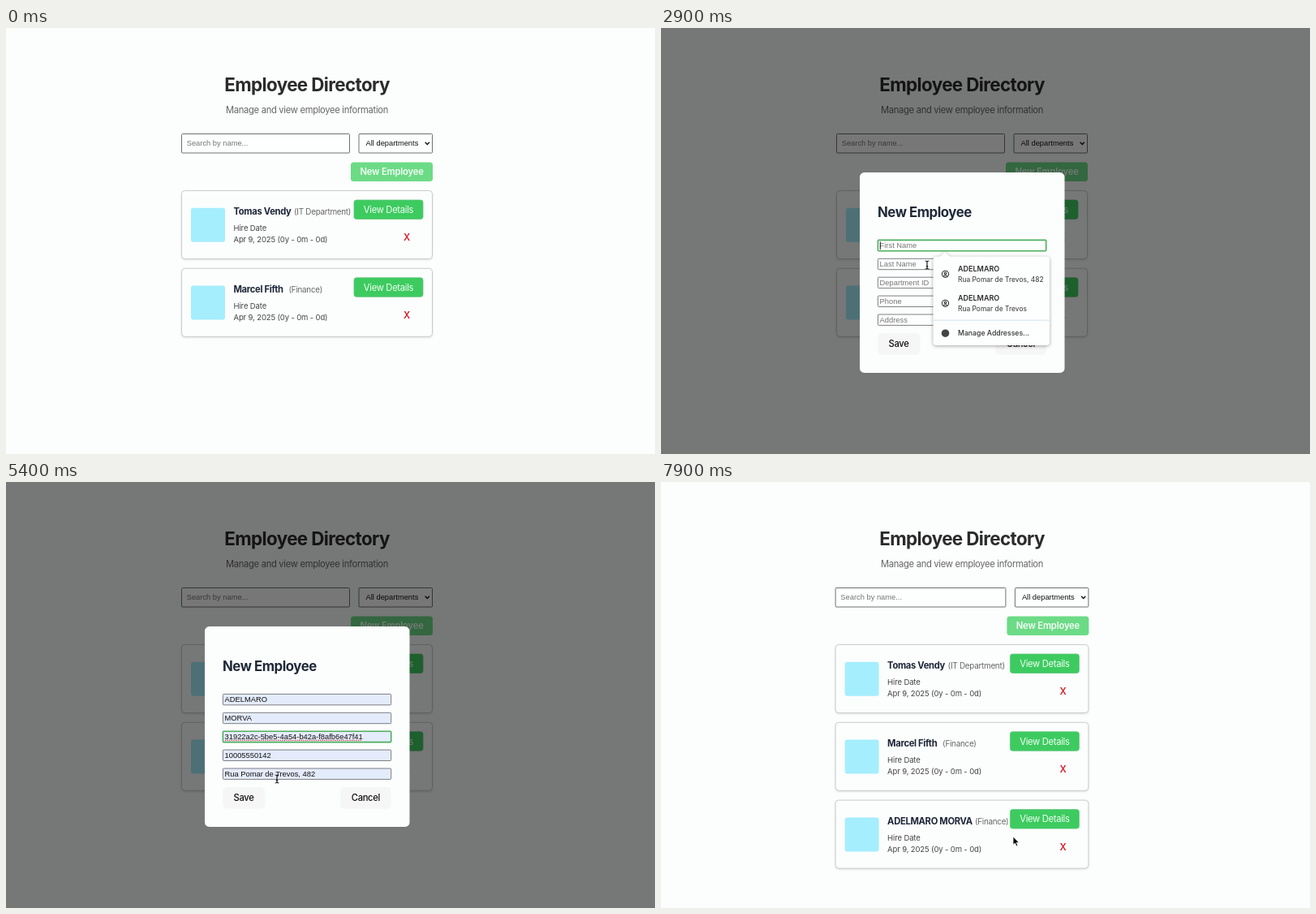
An HTML page that plays this animation: 800 by 525 pixels, repeating every 8000 ms.

```html
<!DOCTYPE html>
<html lang="en">
<head>
<meta charset="utf-8">
<title>Employee Directory</title>
<style>
  html, body { margin: 0; width: 100%; height: 100%; overflow: hidden; background: #fcfdfd; }
  svg { display: block; width: 100vw; height: 100vh; }
  text { font-family: Inter, Roboto, sans-serif; white-space: pre; }
  .ui { letter-spacing: -.027em; }
  .small { letter-spacing: -.014em; }
  .field { font-family: "Liberation Sans", Arial, sans-serif; }
  .card { filter: drop-shadow(0 1px 1px rgba(0, 0, 0, .12)); }
  .popup { filter: drop-shadow(0 1px 2px rgba(0, 0, 0, .35)); }
</style>
</head>
<body>
<svg id="stage" viewBox="0 0 800 525"></svg>
<script>
const LOOP = 8000, STEP = 100;
const stage = document.getElementById('stage');

const EVENTS = {
  cursorIn: 500, modalOpen: 1600, focusName: 2400, nameList: 2500, pickName: 3300,
  focusDept: 3800, deptList: 3900, pickDept: 4800, save: 6400, newCard: 6600
};

const FIRST = 'ADELMARO', LAST = 'MORVA';
const STREET = 'Rua Pomar de Trevos';
const DEPT_ID = '31922a2c-5be5-4a54-b42a-f8afb6e47f41';

const FIELDS = [
  { label: 'First Name', value: FIRST },
  { label: 'Last Name', value: LAST },
  { label: 'Department ID', value: DEPT_ID },
  { label: 'Phone', value: '10005550142' },
  { label: 'Address', value: STREET + ', 482' }
];
const fieldTop = i => 261 + 22.9 * i;

const EMPLOYEES = [
  { name: 'Tomas Vendy', dept: '(IT Department)', deptX: 139 },
  { name: 'Marcel Fifth', dept: '(Finance)', deptX: 132.5 },
  { name: FIRST + ' ' + LAST, dept: '(Finance)', deptX: 172.3 }
];

// Pointer stops: time, x, y
const PATH = [
  [500, 505, 70], [1000, 483, 172], [1300, 481, 175], [1800, 481, 175],
  [2300, 330, 268], [2600, 328, 270], [2900, 328, 292], [3150, 388, 303],
  [3350, 388, 304], [3700, 366, 314], [4000, 366, 316], [4300, 367, 340],
  [4900, 367, 340], [5400, 334, 366], [5800, 291, 390], [6300, 291, 390],
  [6400, 290, 388], [6800, 290, 388], [7700, 434, 437]
];

const between = (t, a, b) => t >= a && t < b;
const inside = (p, x, y, w, h) => p.x >= x && p.x <= x + w && p.y >= y && p.y <= y + h;

function pointerAt(t) {
  const next = PATH.findIndex(k => k[0] > t);
  if (next < 1) {
    const [, x, y] = PATH[next ? PATH.length - 1 : 0];
    return { x, y };
  }
  const [t0, x0, y0] = PATH[next - 1], [t1, x1, y1] = PATH[next];
  const u = (t - t0) / (t1 - t0), k = u * u * (3 - 2 * u);
  return { x: x0 + (x1 - x0) * k, y: y0 + (y1 - y0) * k };
}

const rect = (x, y, w, h, fill, extra = '') =>
  `<rect x="${x}" y="${y}" width="${w}" height="${h}" fill="${fill}" ${extra}/>`;

// The y given is the middle of the capitals
const text = (x, y, size, str, fill, cls = 'ui', extra = '') =>
  `<text x="${x}" y="${y + size * .36}" font-size="${size}" fill="${fill}" class="${cls}" ${extra}>${str}</text>`;

const bold = 'font-weight="700"', semi = 'font-weight="600"', medium = 'font-weight="500"';
const centered = 'text-anchor="middle"';

function card(employee, i, left, right) {
  const y = 200.5 + 95.8 * i, x = left + 64.5;
  return rect(left + .5, y, right - left - 1, 84, '#fcfdfd', 'rx="4" stroke="#cbcdcd" class="card"') +
    rect(left + 12, y + 21.3, 42, 42, '#a5eefe', 'rx="3"') +
    text(x, y + 25.7, 11.2, employee.name, '#1c2537', 'ui', bold) +
    text(left + employee.deptX, y + 26, 9.9, employee.dept, '#666', 'ui') +
    text(x, y + 46.5, 9.5, 'Hire Date', '#444', 'small') +
    text(x, y + 60.3, 9.5, 'Apr 9, 2025 (0y - 0m - 0d)', '#444', 'small') +
    rect(right - 97, y + 11.5, 85, 23.5, '#3dcb60', 'rx="3" stroke="#5fc67a" stroke-width=".8"') +
    text(right - 54.5, y + 23.3, 11.2, 'View Details', '#f4fff6', 'ui', centered) +
    text(right - 32, y + 57.5, 11.4, 'X', '#d5212b', 'ui', `${centered} ${semi}`);
}

function page(t) {
  const third = t >= EVENTS.newCard;
  const left = third ? 214.6 : 216, right = third ? 527.4 : 526;
  const modal = between(t, EVENTS.modalOpen, EVENTS.save);
  const box = 'stroke="#707070" rx="1"';
  return rect(0, 0, 800, 525, '#fcfdfd') +
    text(371, 69.6, 22.4, 'Employee Directory', '#2b2b2b', 'ui', `${bold} ${centered}`) +
    text(371, 101, 11.2, 'Manage and view employee information', '#666', 'ui', centered) +
    rect(left + .5, 130.5, right - left - 103, 23.5, '#fdfefe', box) +
    text(left + 6.7, 142, 9.33, 'Search by name...', '#757575', 'field') +
    rect(right - 91, 130.5, 90.5, 23.5, '#fdfefe', box) +
    text(right - 82.5, 142, 9.33, 'All departments', '#111', 'field') +
    `<path d="M${right - 9.3} 140.7l2.6 2.7 2.6-2.7" fill="none" stroke="#111" stroke-width="1.4"/>` +
    (modal ? rect(right - 101.5, 165, 102, 24.5, 'none', 'rx="4" stroke="#fff" stroke-width="1"') : '') +
    rect(right - 101, 165.5, 101, 23.5, '#6cdb86', 'rx="3.5"') +
    text(right - 50.5, 177.4, 11.2, 'New Employee', '#f6fff8', 'small', `${semi} ${centered}`) +
    EMPLOYEES.slice(0, third ? 3 : 2).map((e, i) => card(e, i, left, right)).join('');
}

function formState(t, p) {
  const nameOpen = between(t, EVENTS.nameList, EVENTS.pickName);
  const deptOpen = between(t, EVENTS.deptList, EVENTS.pickDept);
  const nameHover = nameOpen && inside(p, 336, 286, 143, 34);
  const deptHover = deptOpen && inside(p, 336, 331, 166, 25);
  return {
    nameOpen, deptOpen, nameHover, deptHover,
    focus: t >= EVENTS.focusDept ? 2 : t >= EVENTS.focusName ? 0 : -1,
    contact: t >= EVENTS.pickName || nameHover,
    dept: t >= EVENTS.pickDept || deptHover
  };
}

function caret(t, s) {
  const start = [EVENTS.pickDept, EVENTS.focusDept, EVENTS.pickName, EVENTS.focusName].find(e => t >= e);
  if (start === undefined || s.nameHover || s.deptHover || (t - start) % 1060 >= 530) return '';
  const x = t >= EVENTS.pickDept ? 439.3 : t >= EVENTS.focusDept ? 269.8 : t >= EVENTS.pickName ? 322.2 : 269.8;
  return rect(x, fieldTop(s.focus) + 2.2, .9, 10, '#111');
}

function field(f, i, s) {
  const y = fieldTop(i), filled = i === 2 ? s.dept : s.contact, focused = i === s.focus;
  return rect(267.4, y + .4, 207.3, 13.4, filled ? '#e4ebfb' : '#fdfefe',
      focused ? 'rx="1" stroke="#4caf5c" stroke-width="1.6"' : 'rx="1" stroke="#707277" stroke-width=".9"') +
    text(269.6, y + 7, 9.33, filled ? f.value : f.label, filled ? '#111' : '#757575', 'field');
}

function modal(t, p, s) {
  const onSave = inside(p, 267, 375.5, 52.5, 27.5);
  const misspelt = t >= EVENTS.pickDept
    ? '<path d="M270 318.4H438" stroke="#e0393f" stroke-width="1.2" stroke-dasharray="1.3 1.3"/>' : '';
  return rect(0, 0, 800, 525, '#000', 'opacity=".53"') +
    rect(245, 178, 252.5, 247, '#fcfdfd', 'rx="5.6"') +
    text(267, 226.5, 16.8, 'New Employee', '#1f2937', 'ui', bold) +
    FIELDS.map((f, i) => field(f, i, s)).join('') + misspelt + caret(t, s) +
    rect(267.3, 375.8, 52, 27, '#f6f6f6', `rx="5.6" ${onSave ? 'stroke="#666b80"' : ''}`) +
    text(293, 389.3, 11.2, 'Save', '#111', 'ui', `${medium} ${centered}`) +
    rect(412.3, 375.8, 62.5, 27, '#f6f6f6', 'rx="5.6"') +
    text(443.4, 389.3, 11.2, 'Cancel', '#111', 'ui', `${medium} ${centered}`);
}

const popupBox = (x, y, w, h) =>
  `<g class="popup">${rect(x, y, w, h, '#fdfefe', 'rx="4"')}<path d="M343 ${y + .5}l7-6 7 6z" fill="#fdfefe"/></g>`;

const personIcon = y =>
  `<g transform="translate(350.5 ${y})" fill="none" stroke="#333" stroke-width="1.1">
    <circle r="4.1"/><circle cy="-1" r="1.3"/><path d="M-2.8 2.8Q0 .6 2.8 2.8"/></g>`;

function namePopup(s) {
  const row = (y, address) => personIcon(y + 7) +
    text(366, y, 9, FIRST, '#2c2c2c', '', semi) +
    text(366, y + 14, 8.45, address, '#333', '');
  return popupBox(335.5, 281.8, 143.5, 109.2) +
    (s.nameHover ? rect(337.5, 286, 139.5, 34.5, '#e9eaea', 'rx="2"') : '') +
    row(296.3, STREET + ', 482') + row(332.3, STREET) +
    rect(335.5, 359.6, 143.5, 1, '#cfe0ee') +
    '<circle cx="350.5" cy="376.2" r="4.8" fill="#444"/>' +
    text(366, 376.3, 8.7, 'Manage Addresses...', '#333', '', medium);
}

function deptPopup(s) {
  const hover = s.deptHover
    ? rect(337.5, 331, 163, 25, '#e9eaea', 'rx="2"') +
      '<path d="M485 340.8l5 5m0-5l-5 5" stroke="#444" stroke-width="1"/>' : '';
  return popupBox(335.5, 328.2, 167, 55.3) + hover +
    text(344, 343.4, 9, DEPT_ID.slice(0, 23) + '...', '#2c2c2c', '', semi) +
    text(344, 368.6, 9, '123123', '#2c2c2c', '', semi);
}

const POINTERS = {
  arrow: '<path d="M0 0V10.2L2.4 8 4 11.8 5.8 11 4.2 7.4H7.4Z" fill="#000" stroke="#fff" stroke-width=".8"/>',
  beam: `<path d="M-2.4-5Q0-5 0-3.6Q0-5 2.4-5M0-3.6V3.6M-2.4 5Q0 5 0 3.6Q0 5 2.4 5M-1.2 1.6H1.2"
    fill="none" stroke="#111" stroke-width="1.1"/>`,
  hand: `<path d="M-1.2-1Q0-2.2 1 -1V3L4.4 3.8Q5.4 4.2 5.2 5.6L4.4 9.8H-1.2L-3.4 6Q-4-.0 -1.2 5Z"
    fill="#fff" stroke="#111" stroke-width=".9" stroke-linejoin="round"/><path d="M1 3V5.4M2.9 3.6V5.6" stroke="#111" stroke-width=".7"/>`
};

function pointer(t, p, open, s) {
  if (t < EVENTS.cursorIn) return '';
  const onPopup = s.nameOpen && inside(p, 335.5, 281.8, 144, 110) ||
    s.deptOpen && inside(p, 335.5, 328, 167, 56);
  let kind = 'arrow';
  if (open && !onPopup) {
    if (FIELDS.some((f, i) => inside(p, 267, fieldTop(i), 208, 14))) kind = 'beam';
    else if (inside(p, 267, 375.5, 52.5, 27.5)) kind = 'hand';
  }
  return `<g transform="translate(${p.x.toFixed(2)} ${p.y.toFixed(2)})">${POINTERS[kind]}</g>`;
}

function render(t) {
  const p = pointerAt(t), s = formState(t, p);
  const open = between(t, EVENTS.modalOpen, EVENTS.save);
  return page(t) + (open ? modal(t, p, s) : '') +
    (s.nameOpen ? namePopup(s) : '') + (s.deptOpen ? deptPopup(s) : '') +
    pointer(t, p, open, s);
}

let shown = -1;
function tick() {
  const t = Math.floor(performance.now() % LOOP / STEP) * STEP;
  if (t !== shown) stage.innerHTML = render(shown = t);
  requestAnimationFrame(tick);
}
tick();
</script>
</body>
</html>
```
